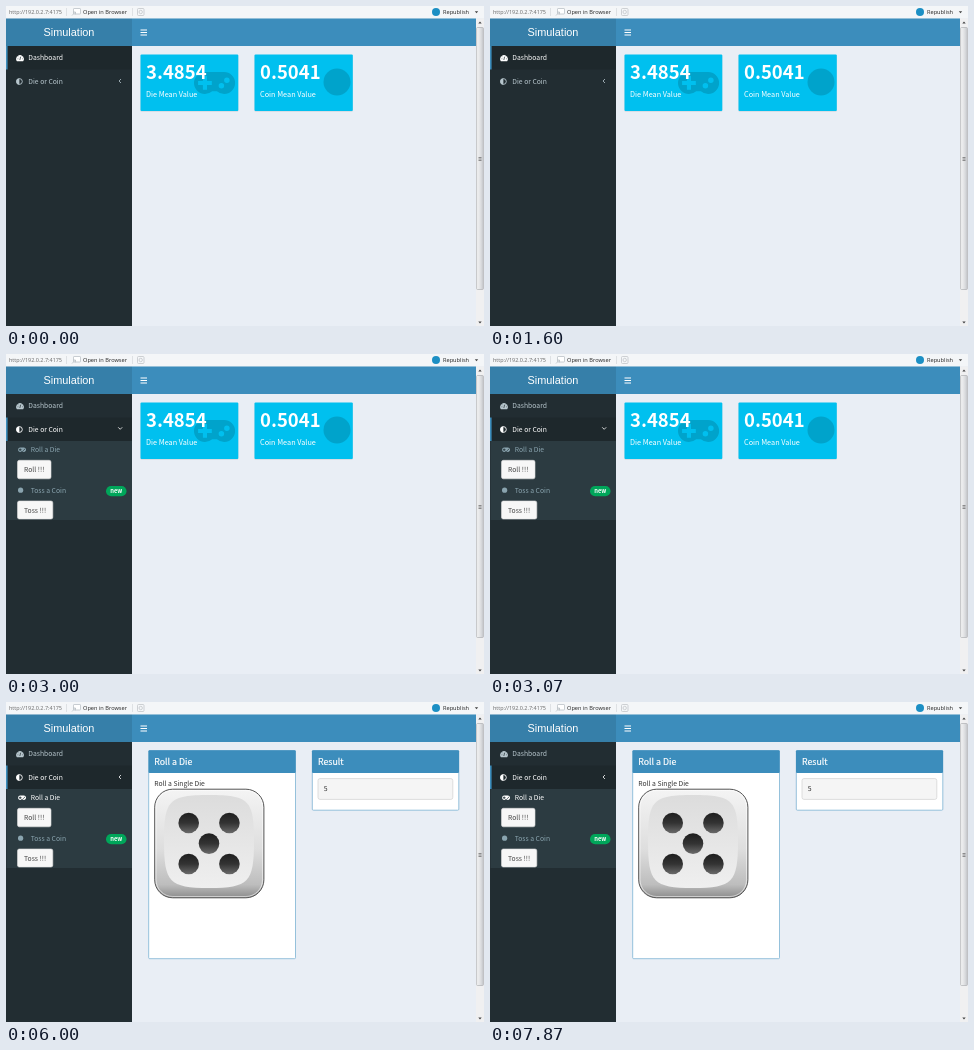
These frames come from a looping animation (478 px wide and 320 px high, 8000 ms). An HTML page:

```html
<!DOCTYPE html>
<html lang="en">
<head>
<meta charset="utf-8">
<title>Simulation dashboard</title>
<style>
  html, body { margin: 0; width: 100%; height: 100%; overflow: hidden; background: #e9eef5; }
  svg { display: block; width: 100%; height: 100%; }
  text { font: 6.8px "Noto Sans CJK JP", "Noto Sans CJK SC", "Noto Sans CJK", "Open Sans", sans-serif; }
  .bar text { font: 5.65px "Open Sans", "Noto Sans", sans-serif; fill: #222; }
  .bar .url { font-size: 5.46px; fill: #666; }
  .logo { font: 10.9px "Liberation Sans", Arial, sans-serif; }
  .big { font-size: 18.5px; font-weight: 700; }
  .label { font-size: 7.3px; }
  .title { font-size: 8.8px; stroke: #fff; stroke-width: .2px; }
  .badge { font-size: 5.8px; font-weight: 700; text-anchor: middle; }
  .out { font: 6.6px "DejaVu Sans Mono", "Liberation Mono", monospace; }
  .line { fill: none; stroke: currentColor; }

  /* 0-3 s closed menu, 3-6 s open menu, 6-8 s die page */
  .closed, .opened, .home, .die, .middle, .edges, .dash, .parent, .roll {
    animation: 8s step-end infinite;
  }
  .closed { animation-name: closed; }
  .opened { animation-name: opened; }
  .home { animation-name: home; }
  .die { animation-name: die; }
  .middle { animation-name: middle; }
  .edges { animation-name: edges; }
  .dash { animation-name: dash; }
  .parent { animation-name: parent; }
  .roll { animation-name: roll; }
  @keyframes closed { 0% { visibility: visible } 37.5%, 100% { visibility: hidden } }
  @keyframes opened { 0% { visibility: hidden } 37.5%, 100% { visibility: visible } }
  @keyframes home { 0% { visibility: visible } 75%, 100% { visibility: hidden } }
  @keyframes die { 0% { visibility: hidden } 75%, 100% { visibility: visible } }
  @keyframes middle { 0% { visibility: hidden } 37.5% { visibility: visible } 75%, 100% { visibility: hidden } }
  @keyframes edges { 0% { visibility: visible } 37.5% { visibility: hidden } 75%, 100% { visibility: visible } }
  @keyframes dash { 0% { color: #fff } 37.5%, 100% { color: #b8c7ce } }
  @keyframes parent { 0% { color: #b8c7ce } 37.5%, 100% { color: #fff } }
  @keyframes roll { 0% { color: #8aa4af } 75%, 100% { color: #fff } }
</style>
</head>
<body>
<svg viewBox="0 0 478 320" fill="currentColor">
  <defs>
    <!-- 1920 x 1024 units -->
    <path id="pad" fill-rule="evenodd" d="M1920 512q0 212-150 362t-362 150q-192 0-338-128h-220q-146 128-338 128-212 0-362-150t-150-362 150-362 362-150h896q212 0 362 150t150 362z
      M416 192h192v224h224v192h-224v224h-192v-224h-224v-192h224z
      M1152 640a128 128 0 1 0 256 0a128 128 0 1 0-256 0z
      M1408 384a128 128 0 1 0 256 0a128 128 0 1 0-256 0z"/>
    <linearGradient id="thumb">
      <stop offset="0" stop-color="#f5f5f5"/><stop offset=".5" stop-color="#e2e3e5"/><stop offset="1" stop-color="#c6c8cc"/>
    </linearGradient>
    <linearGradient id="shell" x2="0" y2="1">
      <stop offset="0" stop-color="#f4f4f4"/><stop offset=".55" stop-color="#dedede"/>
      <stop offset=".88" stop-color="#bdbdbd"/><stop offset="1" stop-color="#8c8c8c"/>
    </linearGradient>
    <linearGradient id="face" x2="0" y2="1">
      <stop offset="0" stop-color="#dcdcdc"/><stop offset="1" stop-color="#efefef"/>
    </linearGradient>
    <linearGradient id="pip" x2="0" y2="1">
      <stop offset="0" stop-color="#1e1e1e"/><stop offset=".5" stop-color="#333"/><stop offset="1" stop-color="#6a6a6a"/>
    </linearGradient>
    <circle id="dot" r="10.3" fill="url(#pip)"/>
  </defs>

  <rect width="478" height="320" fill="#e9eef5"/>

  <!-- toolbar -->
  <g class="bar">
    <rect width="478" height="12.5" fill="#f4f6f8"/>
    <text class="url" x="3" y="8">http://192.0.2.7:4175</text>
    <path d="M60.5 2v8M126.5 2v8" stroke="#d4d8dc" stroke-width=".7"/>
    <g fill="#fff" stroke="#b4bac0" stroke-width=".7">
      <rect x="67.5" y="2.5" width="7" height="5.5" rx=".6"/>
      <path d="M66 9.5l3.5-3.5m-2.3 0h2.3v2.3" fill="none"/>
    </g>
    <text x="77" y="8">Open in Browser</text>
    <g fill="none" stroke="#c3c7cb" stroke-width=".8">
      <rect x="131.5" y="2.5" width="6.5" height="7" rx="1"/>
      <circle cx="134.7" cy="6" r="1.7"/>
    </g>
    <circle cx="430" cy="6" r="4" fill="#1c8fc4"/>
    <text x="437" y="8">Republish</text>
    <path d="M468.8 5.2h3.4l-1.7 2z" fill="#444"/>
  </g>

  <!-- header -->
  <rect x="126" y="12.5" width="344" height="27.5" fill="#3c8dbc"/>
  <rect y="12.5" width="126" height="27.5" fill="#367fa9"/>
  <g color="#fff">
    <text class="logo" x="63" y="30" text-anchor="middle">Simulation</text>
    <path class="line" d="M134.5 24h6.5m-6.5 2.5h6.5m-6.5 2.5h6.5" stroke-width="1.1"/>
  </g>

  <!-- sidebar -->
  <rect y="40" width="126" height="280" fill="#222d32"/>
  <g class="closed">
    <rect y="40" width="126" height="23.5" fill="#1e282c"/>
    <rect y="40" width="1.6" height="23.5" fill="#3c8dbc"/>
  </g>
  <g class="opened">
    <rect y="63.5" width="126" height="23.5" fill="#1e282c"/>
    <rect y="63.5" width="1.6" height="23.5" fill="#3c8dbc"/>
    <rect x=".5" y="87" width="125.5" height="79" fill="#2c3b41"/>
  </g>
  <g class="dash">
    <path d="M10.9 55.2a3.8 3.8 0 1 1 6.2 0z"/>
    <path d="M13.8 54l1-3.4M11.6 52.8h.7M12.3 50.7l.5.5M16 52.8h.6" stroke="#222d32" stroke-width=".7"/>
    <text x="22.3" y="54.3">Dashboard</text>
  </g>
  <g class="parent">
    <circle class="line" cx="13.4" cy="75.5" r="2.9" stroke-width=".9"/>
    <path d="M13.4 72.4a3.1 3.1 0 0 0 0 6.2z"/>
    <text x="22.3" y="77.9">Die or Coin</text>
    <path class="line edges" d="M115 73l-2 2 2 2" stroke-width=".8"/>
    <path class="line middle" d="M112.2 73.3l2 2 2-2" stroke-width=".8"/>
  </g>
  <g class="opened" color="#8aa4af">
    <g class="roll">
      <use href="#pad" transform="translate(12 93.6) scale(.0042)"/>
      <text x="24.7" y="98.4">Roll a Die</text>
    </g>
    <circle cx="14.6" cy="136.2" r="2.6"/>
    <text x="24.7" y="138.8">Toss a Coin</text>
    <rect x="100" y="132" width="20.5" height="10.3" rx="5.1" fill="#00a65a"/>
    <text class="badge" x="110.3" y="139.2" fill="#fff">new</text>
    <g fill="#f7f7f7" stroke="#ddd" stroke-width=".6">
      <rect x="11.5" y="106.3" width="33.5" height="18.5" rx="1.8"/>
      <rect x="11.5" y="147" width="35.3" height="18" rx="1.8"/>
    </g>
    <g fill="#444">
      <text x="18" y="118">Roll !!!</text>
      <text x="18" y="158.6">Toss !!!</text>
    </g>
  </g>

  <!-- value boxes -->
  <g class="home">
    <g fill="#00000018">
      <rect x="134.5" y="49" width="97.8" height="56.8" rx="1"/>
      <rect x="248.5" y="49" width="98.3" height="56.8" rx="1"/>
    </g>
    <g fill="#00c0ef">
      <rect x="134.5" y="48.5" width="97.8" height="56.5" rx="1"/>
      <rect x="248.5" y="48.5" width="98.3" height="56.5" rx="1"/>
    </g>
    <g fill="#00a3cb">
      <use href="#pad" transform="translate(188 66) scale(.0214)"/>
      <circle cx="331" cy="76" r="13.5"/>
    </g>
    <g fill="#fff">
      <text class="big" x="140" y="73">3.4854</text>
      <text class="label" x="140" y="91">Die Mean Value</text>
      <text class="big" x="254" y="73">0.5041</text>
      <text class="label" x="254" y="91">Coin Mean Value</text>
    </g>
  </g>

  <!-- die page -->
  <g class="die">
    <g fill="#fff" stroke="#7db3d3" stroke-width=".8">
      <rect x="142.7" y="48.5" width="146.8" height="208.2" rx="1"/>
      <rect x="306.3" y="48.5" width="146.5" height="59.7" rx="1"/>
    </g>
    <g fill="#3c8dbc">
      <rect x="142.5" y="48.3" width="147.2" height="22.7" rx="1"/>
      <rect x="306" y="48.3" width="147" height="22.7" rx="1"/>
    </g>
    <g fill="#fff">
      <text class="title" x="148.3" y="63">Roll a Die</text>
      <text class="title" x="312" y="63">Result</text>
    </g>
    <text x="148.3" y="84.2" fill="#333">Roll a Single Die</text>

    <rect x="148.7" y="87.2" width="109.2" height="108.6" rx="18" fill="url(#shell)" stroke="#555" stroke-width="1"/>
    <rect x="150" y="88.5" width="106.6" height="106" rx="16.8" fill="none" stroke="#fff" stroke-opacity=".55"/>
    <path d="M158 139C158 98 163 93 203 93S248 98 248 139 243 186 203 186 158 180 158 139z" fill="url(#face)"/>
    <use href="#dot" x="182.7" y="121"/>
    <use href="#dot" x="223.4" y="121"/>
    <use href="#dot" x="203" y="141.6"/>
    <use href="#dot" x="182.7" y="162"/>
    <use href="#dot" x="223.4" y="162"/>

    <rect x="312" y="76.6" width="134.8" height="20.8" rx="2" fill="#f5f5f5" stroke="#d2d2d2" stroke-width=".7"/>
    <text class="out" x="317.8" y="89.2" fill="#333">5</text>
  </g>

  <!-- scrollbar -->
  <rect x="470" y="12.5" width="8" height="307.5" fill="#f0f0f1"/>
  <rect x="470.6" y="21.5" width="6.8" height="262" rx="1" fill="url(#thumb)" stroke="#a5a7aa" stroke-width=".6"/>
  <path d="M472.5 151.5h3m-3 1.5h3m-3 1.5h3" stroke="#666" stroke-width=".7"/>
  <path d="M472.3 17.5h3.4l-1.7-2zM472.3 315.5h3.4l-1.7 2z" fill="#444"/>
</svg>
</body>
</html>
```
